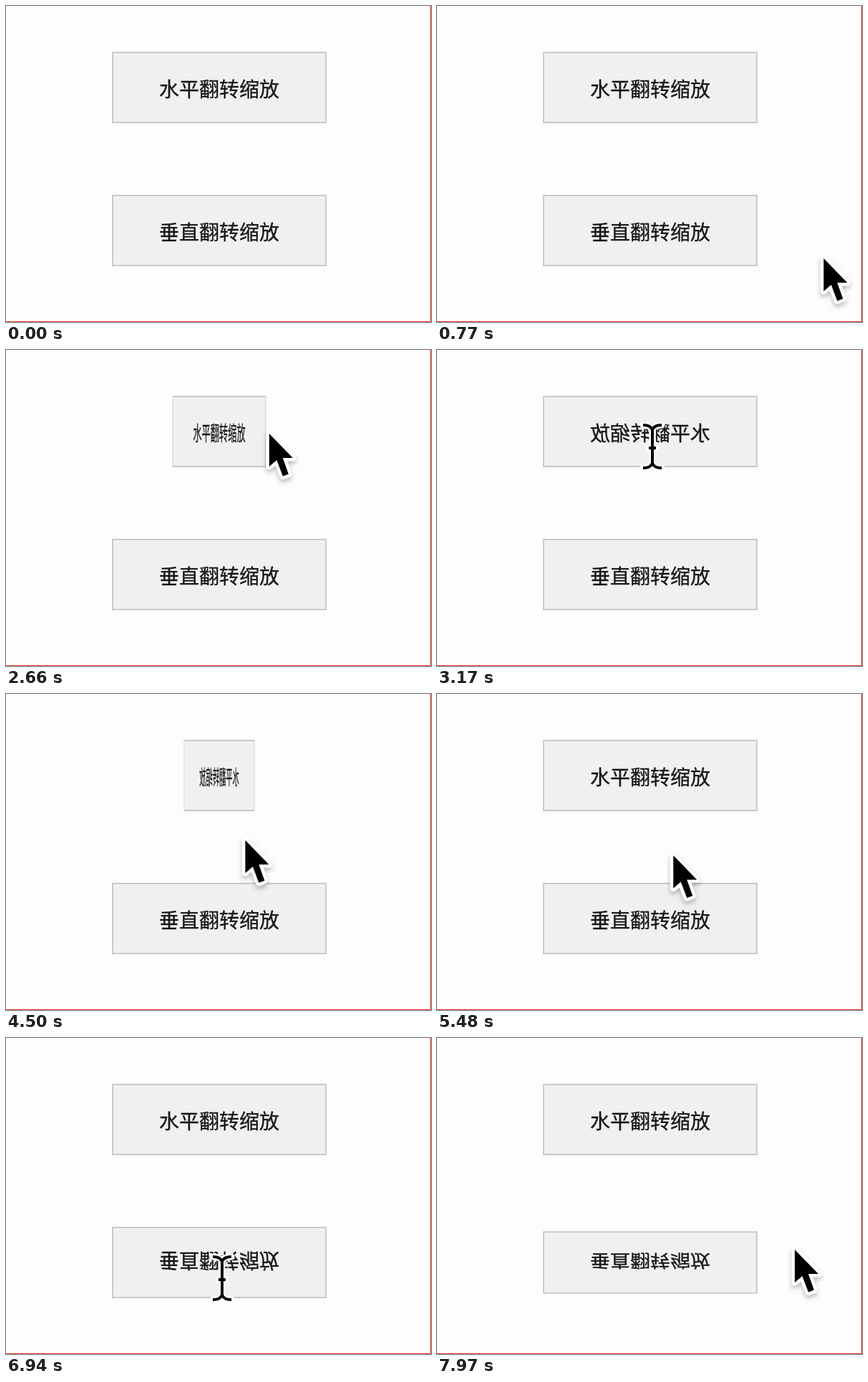
Animation of 594x442 px, one loop 8000 ms. Source, as an HTML page:

```html
<!DOCTYPE html>
<html lang="zh">
<head>
<meta charset="utf-8">
<style>
  html, body { margin: 0; width: 100%; height: 100%; overflow: hidden; background: #fdfdfd; }
  svg { display: block; width: 594px; height: 442px; }
  text {
    font: 28px "Noto Sans CJK SC", "Noto Sans CJK", sans-serif;
    text-anchor: middle; fill: #161616; stroke: #161616; stroke-width: .3px;
  }
  #arrow { filter: drop-shadow(0 4px 3px rgba(0, 0, 0, .25)); }
  .edge { stroke: #fff; stroke-linejoin: round; stroke-linecap: round; }
</style>
</head>
<body>
<svg viewBox="0 0 594 442">
  <defs>
    <rect id="panel" x="-149" y="-49" width="298" height="98" fill="#f0f0f0" stroke="#c9c9c9" stroke-width="2"/>
    <path id="arrowShape" d="M0 0V46L10.5 37L19 59.5L27 56.5L19 34H33Z"/>
    <path id="beamShape" fill="none" d="M-13 -30Q-2 -30 0 -23Q2 -30 13 -30M0 -23V23M-13 30Q-2 30 0 23Q2 30 13 30M-5 2H5"/>
  </defs>
  <g id="wide"><use href="#panel"/><text y="13">水平翻转缩放</text></g>
  <g id="tall"><use href="#panel"/><text y="13">垂直翻转缩放</text></g>
  <g id="cursor">
    <g id="arrow">
      <use href="#arrowShape" class="edge" stroke-width="9" fill="#fff"/>
      <use href="#arrowShape"/>
    </g>
    <g id="beam" transform="translate(0 27)">
      <use href="#beamShape" class="edge" stroke-width="9"/>
      <use href="#beamShape" stroke="#000" stroke-width="4"/>
    </g>
  </g>
  <path d="M593.5 0V441.5H0" fill="none" stroke="#e8281c"/>
</svg>
<script>
const LOOP = 8000;
const $ = id => document.getElementById(id);
const wide = $('wide'), tall = $('tall'), cursor = $('cursor'), arrow = $('arrow'), beam = $('beam');

// pointer moves: start, end, x, y reached
const moves = [
  [430, 680, 560, 400], [680, 810, 532, 333],
  [1890, 2180, 525, 250], [2180, 2560, 446, 145], [2560, 2660, 368, 117], [2660, 3170, 301, 108],
  [4100, 4520, 336, 209], [5360, 6080, 302, 309], [7760, 7970, 500, 296]
];

const clamp = k => Math.min(1, Math.max(0, k));

function pointer(t) {
  let x = 242, y = 416;
  for (const [start, end, toX, toY] of moves) {
    const k = clamp((t - start) / (end - start));
    x += (toX - x) * k;
    y += (toY - y) * k;
  }
  return [x, y];
}

// CSS "ease": cubic-bezier(.25, .1, .25, 1)
function ease(x) {
  const curve = (u, p, q) => 3 * (1 - u) ** 2 * u * p + 3 * (1 - u) * u * u * q + u ** 3;
  let u = 0;
  for (let step = .5; step > 1e-6; step /= 2) if (curve(u + step, .25, .25) < x) u += step;
  return curve(u, .1, 1);
}

const turn = (t, start, span) => 2 * ease(clamp((t - start) / span));
const show = (el, on) => el.setAttribute('visibility', on ? 'visible' : 'hidden');

function draw(t) {
  const sx = 1 - turn(t, 2560, 520) + turn(t, 4414, 400);
  const sy = 1 - turn(t, 6046, 600) + turn(t, 7932, 500);
  wide.setAttribute('transform', `translate(298 114) scale(${sx} 1)`);
  tall.setAttribute('transform', `translate(298 314) scale(1 ${sy})`);

  const overText = (t >= 2880 && t < 4400) || (t >= 6170 && t < 7860);
  cursor.setAttribute('transform', `translate(${pointer(t)})`);
  show(arrow, t >= 430 && !overText);
  show(beam, overText);
}

const begin = performance.now();
function tick() {
  draw((performance.now() - begin) % LOOP);
  requestAnimationFrame(tick);
}
tick();
</script>
</body>
</html>
```
